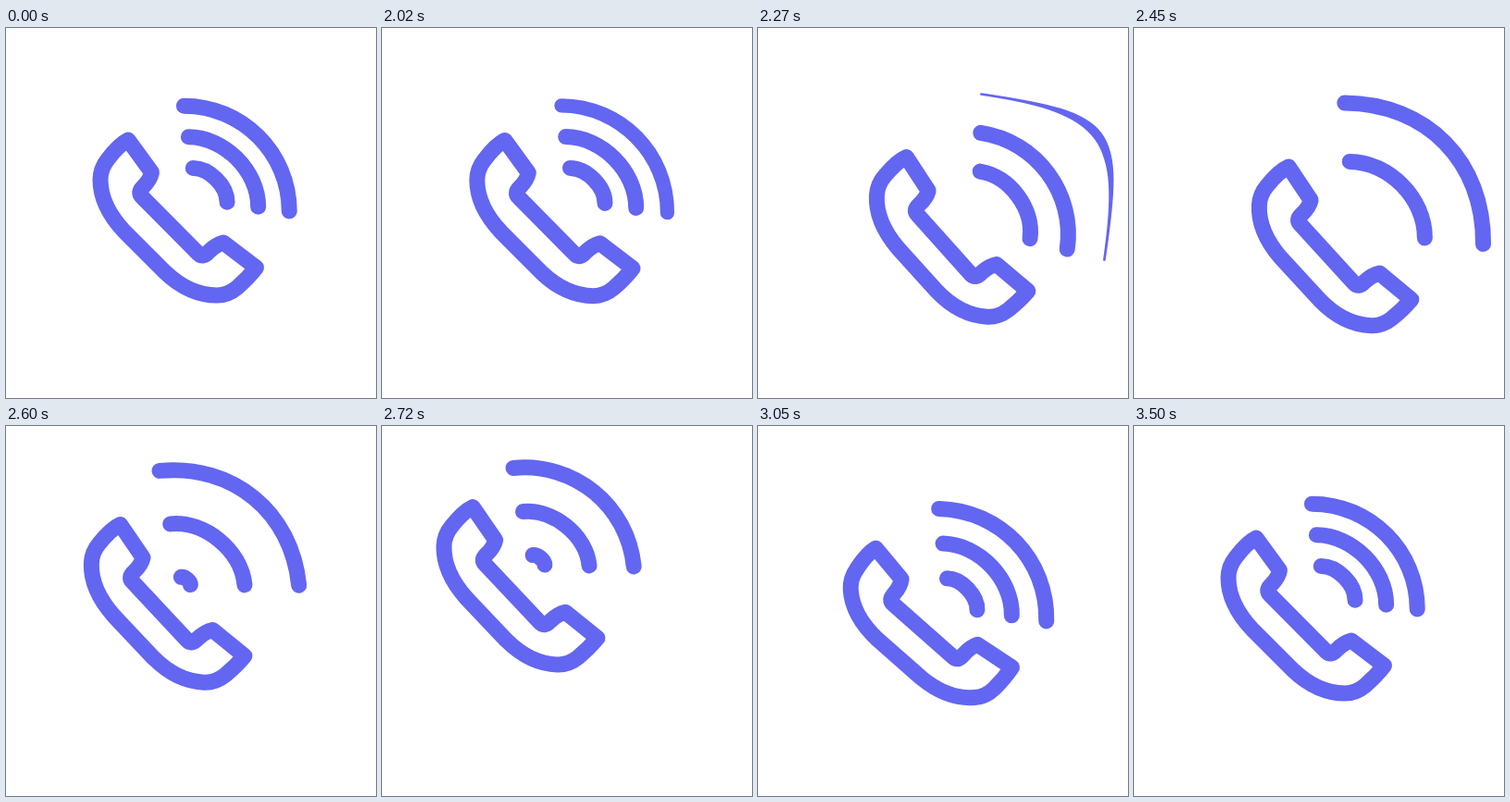
Recreate the animation shown at these times as an HTML page with a canvas. Size 400x400 px, loop 3.52 s.

```html
<!DOCTYPE html>
<html lang="en">
<head>
<meta charset="utf-8">
<title>Ringing phone</title>
<style>
  html, body { margin: 0; width: 100%; height: 100%; overflow: hidden; background: #fff; }
  canvas { display: block; width: 100vmin; height: 100vmin; }
</style>
</head>
<body>
<canvas id="stage" width="400" height="400"></canvas>
<script>
const ctx = document.getElementById('stage').getContext('2d');
const LOOP = 3520, STEP = 25, RING = 2020, EASE_IN = 1990, END = 3500;
const COLOR = '#6366f1', WEIGHT = 17;
const CENTER = [201.5, 190], WAVE_PIVOT = [207, 240], APEX_HEIGHT = 56.5;

const handset = new Path2D(
  'M132 121 L157.5 156 Q156 164 148 172 Q142 178 147 182.5 L208 244 ' +
  'Q213 249 219 242 Q227 234 235 232 L270.5 259 Q262 270 250 280.5 Q240 289 228 289 ' +
  'C210 289 190 281 172 264 L128 220 C112 203 102 183 102 164 Q102 152 110 142 Q122 126 132 121 Z');

const clamp01 = v => Math.min(1, Math.max(0, v));
const mix = (a, b, k) => a + (b - a) * k;
const radians = degrees => degrees * Math.PI / 180;

// Smooth curve through [time, value] keys that never overshoots them
function track(from, to, ...middle) {
  const keys = [[EASE_IN, from], ...middle, [END, to]], last = keys.length - 1;
  const rate = n => (keys[n + 1][1] - keys[n][1]) / (keys[n + 1][0] - keys[n][0]);
  const slope = n => {
    if (n === 0 || n === last) return 0;
    const a = rate(n - 1), b = rate(n);
    return a * b > 0 ? 2 * a * b / (a + b) : 0;
  };
  return time => {
    const t = Math.min(END, Math.max(EASE_IN, time));
    let i = 0;
    while (i < last - 1 && t > keys[i + 1][0]) i++;
    const span = keys[i + 1][0] - keys[i][0], k = (t - keys[i][0]) / span;
    return mix(keys[i][1], keys[i + 1][1], k * k * (3 - 2 * k))
      + span * k * (1 - k) * ((1 - k) * slope(i) - k * slope(i + 1));
  };
}

// The whole phone swings down right, up left, then settles
const shiftX = track(0, 0, [2270, 24.5], [2410, 36], [2600, -10.5], [2715, -36], [2850, -15.5], [3140, 2]);
const shiftY = track(0, 0, [2270, 21.5], [2410, 36], [2600, -12.5], [2715, -32], [2850, -4.5], [3140, 8]);
const phoneTurn = track(0, 0, [2270, 2.9], [2600, 1.7], [2850, 1.2], [3050, -3.7]);

// The waves trail behind it; a wave's size is base + spacing * level
const waveTurn = track(0, 0, [2270, 8.4], [2600, -5.6], [2850, -5.8], [3050, 1.3]);
const waveDrop = track(0, 0, [2270, 6], [2850, -3.5], [3050, 4]);
const base = track(-2.5, 52, [2270, 24], [2600, 13], [2850, 24], [3050, 47]);
const spacing = track(54.5, 54.5, [2270, 66], [2510, 103], [2600, 91], [2850, 66]);

function rotateAbout([x, y], degrees) {
  ctx.translate(x, y);
  ctx.rotate(radians(degrees));
  ctx.translate(-x, -y);
}

// A wave lies on a level chord above the apex; a pull of 0.39 is a quarter circle
function drawWave(time, level, { weight = WEIGHT, pull, lens = 0 } = {}) {
  const gap = spacing(time), size = Math.max(0, base(time) + gap * level);
  const half = size / 2, y = -size * (0.32 + 0.00095 * gap);
  const handle = amount => size * amount * Math.SQRT1_2;
  const bend = pull ?? 0.31 + 0.0005 * size;
  const outer = handle(bend), inner = handle(bend - lens);
  ctx.lineWidth = weight;
  ctx.beginPath();
  ctx.moveTo(-half, y);
  ctx.bezierCurveTo(outer - half, y - outer, half - outer, y - outer, half, y);
  if (lens) {
    ctx.bezierCurveTo(half - inner, y - inner, inner - half, y - inner, -half, y);
    ctx.fill();
  }
  ctx.stroke();
}

function drawWaves(time) {
  ctx.save();
  rotateAbout(WAVE_PIVOT, waveTurn(time));
  ctx.translate(WAVE_PIVOT[0], WAVE_PIVOT[1] - APEX_HEIGHT + waveDrop(time));
  ctx.rotate(radians(45));
  drawWave(time, 1);
  drawWave(time, 2);

  const grow = clamp01((time - 2520) / 60);
  if (grow) drawWave(time, 0, { weight: WEIGHT * grow });

  // The outermost wave bulges and thins into a sliver as it leaves
  const k = clamp01((time - EASE_IN) / 280), fade = clamp01((2320 - time) / 50);
  if (fade) drawWave(time, 3, {
    weight: mix(WEIGHT, 3, k) * fade,
    pull: mix(0.39, 0.66, k * k),
    lens: 0.07 * k * fade
  });
  ctx.restore();
}

function drawHandset(time) {
  ctx.save();
  rotateAbout(CENTER, phoneTurn(time));
  ctx.lineWidth = WEIGHT;
  ctx.stroke(handset);
  ctx.restore();
}

function draw(now) {
  const t = now % LOOP;
  const time = t < RING ? END : Math.floor((t + 5) / STEP) * STEP;
  ctx.fillStyle = '#fff';
  ctx.fillRect(0, 0, 400, 400);
  ctx.fillStyle = ctx.strokeStyle = COLOR;
  ctx.lineCap = ctx.lineJoin = 'round';
  ctx.save();
  ctx.translate(shiftX(time), shiftY(time));
  drawHandset(time);
  drawWaves(time);
  ctx.restore();
}

const begin = performance.now();
function tick() {
  draw(performance.now() - begin);
  requestAnimationFrame(tick);
}
tick();
</script>
</body>
</html>
```
